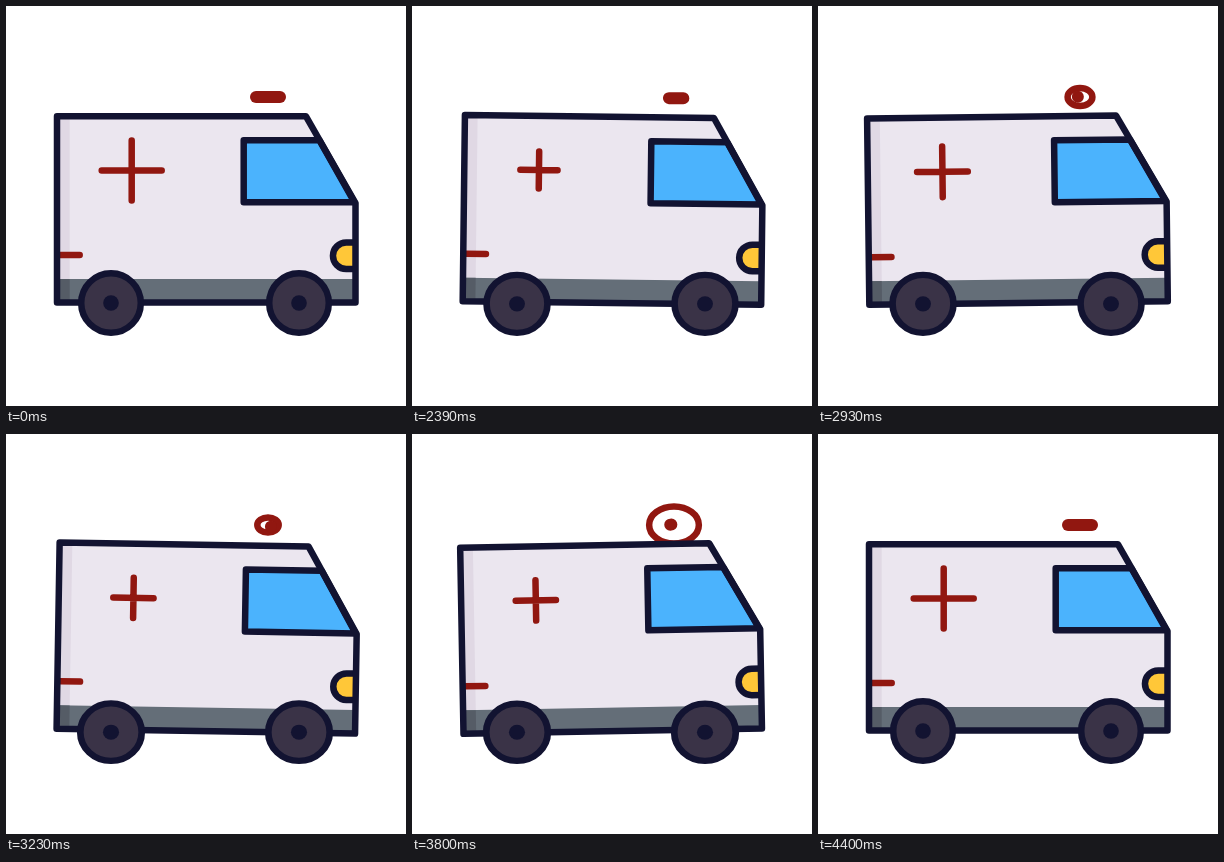
Animation, 400 px wide and 400 px high, one loop 4.43 s. Source, as an HTML page:

```html
<!DOCTYPE html>
<html lang="en">
<head>
<meta charset="utf-8">
<title>Ambulance</title>
<style>
  html, body { margin: 0; width: 100%; height: 100%; overflow: hidden; background: #fff; }
  svg { display: block; width: 100vw; height: 100vh; }
  .ink { stroke: #121331; stroke-width: 6.5; stroke-linejoin: round; }
  .red { stroke: #911710; stroke-width: 6.5; stroke-linecap: round; fill: none; }
</style>
</head>
<body>
<svg viewBox="0 0 400 400">
  <ellipse id="ring" class="red" cx="262" cy="91"/>
  <g id="van">
    <path d="M51 110.3H300L349.5 197V296.5H51Z" fill="#ebe6ef"/>
    <path d="M51 110.3H63.7V273H51Z" fill="#e0d8e4"/>
    <path d="M51 273H349.5V296.5H51Z" fill="#646e78"/>
    <path d="M51 273H63.7V296.5H51Z" fill="#555c66"/>
    <path class="red" d="M54 249H73.7"/>
    <path class="ink" d="M349.5 236.5H340.2a13.25 13.25 0 0 0 0 26.5H349.5" fill="#ffc738"/>
    <path class="ink" d="M237.7 134.3H313.5L348.5 196.3H237.7Z" fill="#4bb3fd"/>
    <path class="ink" d="M51 110.3H300L349.5 197V296.5H51Z" fill="none"/>
    <path id="cross" class="red"/>
    <path id="light" class="red" style="stroke-width:12"/>
  </g>
  <g id="wheels"></g>
</svg>
<script>
const $ = id => document.getElementById(id);
const LOOP = 4430, START = 2000, STEP = 30;
const PULSE = 25, RING = 40 / 3, RING_LIFE = 11.3;
// sway keys: step, degrees
const SWAY = [[0, 0], [8, 1.1], [26, -1.1], [44, 1.1], [62, -1.1], [75, 0]];

const clamp = x => Math.min(1, Math.max(0, x));
const smooth = x => { x = clamp(x); return x * x * (3 - 2 * x); };
const mix = (a, b, s) => a + (b - a) * s;

const wheels = [105, 293].map(x => {
  const g = document.createElementNS("http://www.w3.org/2000/svg", "g");
  g.innerHTML = '<circle class="ink" r="29.8" cy="-33" fill="#3a3347"/><circle r="7.8" cy="-33" fill="#121331"/>';
  $("wheels").append(g);
  return { g, x };
});

function sway(n) {
  for (let i = 1; i < SWAY.length; i++) {
    const [a, from] = SWAY[i - 1], [b, to] = SWAY[i];
    if (n < b) return mix(from, to, smooth((n - a) / (b - a)));
  }
  return 0;
}

function drawRing(n) {
  const age = n % RING;
  const on = n > 0 && n < RING * 5 && age < RING_LIFE;
  $("ring").setAttribute("visibility", on ? "visible" : "hidden");
  const s = smooth(Math.pow(age / RING_LIFE, 2.6));
  $("ring").setAttribute("rx", mix(10.7, 99, s));
  $("ring").setAttribute("ry", mix(7.6, 75, s));
}

function draw(t) {
  const n = Math.max(0, Math.min(80, Math.floor((t - START) / STEP + 1e-6)));
  const angle = sway(n), squash = Math.abs(angle) / 1.1;

  $("van").setAttribute("transform", `translate(0 ${0.75 * squash}) rotate(${angle} 200 270)`);
  for (const { g, x } of wheels)
    g.setAttribute("transform", `translate(${x} 330) scale(${1 + 0.036 * squash} ${1 - 0.042 * squash})`);

  const p = n - 0.5;
  const dip = p > 0 && p < PULSE * 3 ? Math.sin(Math.PI * p / PULSE) ** 2 : 0;
  const r = 30 * (1 - 0.38 * dip);
  $("cross").setAttribute("d", `M${125.7 - r} 164.4h${2 * r}M125.7 ${164.4 - r}v${2 * r}`);

  const half = 12 * (1 - smooth(n / 30) + smooth((n - 57) / 23));
  $("light").setAttribute("d", `M${262 - half} 91h${Math.max(0.01, 2 * half)}`);

  drawRing(n);
}

const begin = performance.now();
function tick() {
  draw((performance.now() - begin) % LOOP);
  requestAnimationFrame(tick);
}
tick();
</script>
</body>
</html>
```
